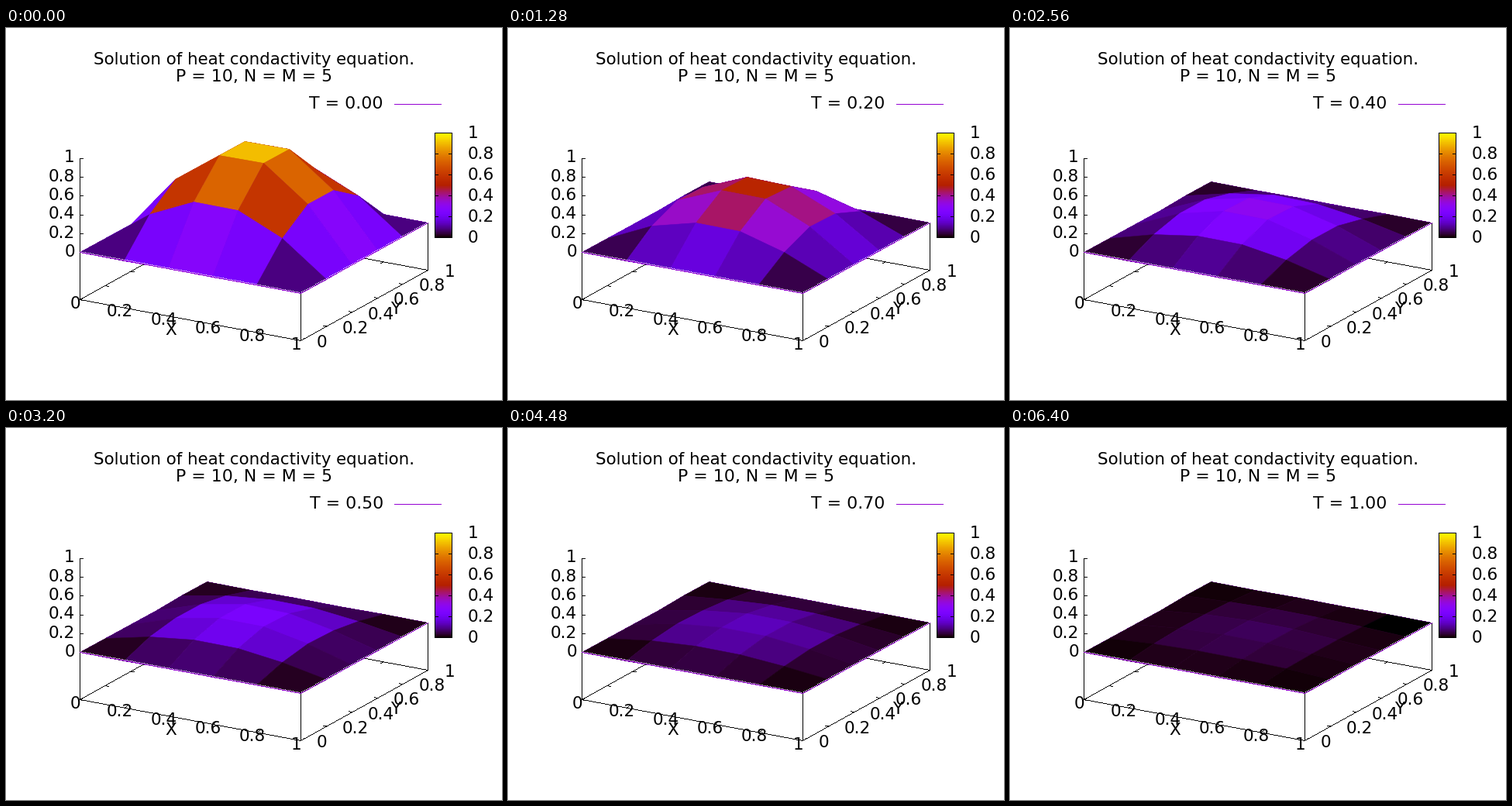
A matplotlib script that plays this animation: 640 by 480 pixels, repeating every 7040 ms.

```python
import numpy as np
import matplotlib.pyplot as plt
from matplotlib.animation import FuncAnimation
from matplotlib.collections import PolyCollection

W, H, DPI = 640, 480, 100
PX = 72 / DPI                      # one pixel in points
PURPLE = "#9400D3"
CELLS, STEPS, SWEEPS = 5, 10, 3
RATE = 0.096                       # diffusion number of one sweep
LEVELS = 192
ORIGIN = np.array([95, 289.2])
EX, EY = np.array([285, 52.5]), np.array([164.3, -91])
EZ = np.array([0, -121.5])
FLOOR = -60.8 / 121.5
SQUARE = np.array([[0, 0], [1, 0], [1, 1], [0, 1]])


def project(x, y, z=0.0):
    return ORIGIN + x * EX + y * EY + z * EZ


def heat_colour(value):
    level = min(int(max(value, 0) * LEVELS), LEVELS - 1)
    g = level / (LEVELS - 1)
    return np.sqrt(g), g ** 3, max(np.sin(2 * np.pi * g), 0)


def solve():
    """Temperature fields for all time steps, relaxed in place."""
    s = np.sin(np.pi * np.linspace(0, 1, CELLS + 1))
    s[-1] = 0
    u = np.outer(s, s)
    fields = [u.copy()]
    for _ in range(STEPS):
        for _ in range(SWEEPS):
            for i in range(1, CELLS):
                for j in range(1, CELLS):
                    around = u[i - 1, j] + u[i + 1, j] + u[i, j - 1] + u[i, j + 1]
                    u[i, j] += RATE * (around - 4 * u[i, j])
        fields.append(u.copy())
    return fields


fields = solve()
grid = np.linspace(0, 1, CELLS + 1)

fig = plt.figure(figsize=(W / DPI, H / DPI), dpi=DPI, facecolor="white")
ax = fig.add_axes([0, 0, 1, 1])


def to_pixel(p):
    return np.floor(np.asarray(p, float) + 0.5)


def trace(p, q):
    """Pixels of a hard one-pixel line from p to q."""
    p, q = to_pixel(p), to_pixel(q)
    n = int(abs(q - p).max())
    return to_pixel(np.linspace(p, q, n + 1))


def squares(pixels):
    return np.asarray(pixels)[:, None, :] + SQUARE


def polygons(verts, zorder, color="black", **kw):
    coll = PolyCollection(verts, facecolors=color, snap=False, zorder=zorder,
                          **{"edgecolors": "none", "linewidths": 0, **kw})
    ax.add_collection(coll, autolim=False)
    return coll


def line(p, q, color="black", zorder=1):
    polygons(squares(trace(p, q)), zorder, color)


def label(x, y, text, ha="center", size=21.6):
    return ax.text(x, y, text, ha=ha, va="baseline", size=size * PX,
                   family="DejaVu Sans", color="black", zorder=6)


def draw_box():
    corners = [(0, 0), (1, 0), (1, 1), (0, 1), (0, 0)]
    for a, b in zip(corners, corners[1:]):
        line(project(*a, FLOOR), project(*b, FLOOR))
    for a in corners[:3]:
        line(project(*a, FLOOR), project(*a))
    line(project(0, 0), project(0, 0, 1))

    tick_x, tick_y = 0.014 * EX, 0.024 * EY
    for k, v in enumerate(grid):
        name = f"{v:.1g}"
        for side, sign in ((0, 1), (1, -1)):
            p, q = project(v, side, FLOOR), project(side, v, FLOOR)
            line(p, p + sign * tick_y)
            line(q, q + sign * tick_x)
        z = project(0, 0, v)
        line(z, z + [4, 0])
        label(89.8 + 57 * k, 361.8 + 10.6 * k, name)
        label(401 + 33 * k, 412 - 18.2 * k, name, "left")
        label(88.8, z[1] + 5.7, name, "right")
    label(213, 395.5, "X")
    label(503, 369, "Y")


def draw_colour_bar():
    left, right, top, bottom = 553, 575, 135, 270
    ramp = [[heat_colour(v)] for v in np.linspace(1, 0, bottom - top + 1)]
    ax.imshow(ramp, extent=(left, right + 1, bottom + 1, top), aspect="auto",
              interpolation="nearest", zorder=3)
    for y in (top, bottom):
        line((left, y), (right, y), zorder=4)
    for x in (left, right):
        line((x, top), (x, bottom), zorder=4)
    for v in grid:
        y = bottom - v * (bottom - top)
        line((left, y), (left + 4, y), zorder=4)
        line((right - 4, y), (right, y), zorder=4)
        label(595.7, y + 6.7, f"{v:.1g}", "left")


draw_box()
draw_colour_bar()
label(320, 47, "Solution of heat condactivity equation.", size=21.4)
label(320, 69, "P = 10, N = M = 5", size=22)
line((501, 98), (561, 98), PURPLE, 4)
time_label = label(486.8, 104, "", "right", 22)

wires = polygons([], 2, PURPLE)
surface = polygons([], 3, linewidths=0.5 * PX)

# near rim of the plate: purple with white gaps above it
for a, b in (((0, 0), (1, 0)), ((1, 0), (1, 1))):
    rim = trace(project(*a), project(*b))
    polygons(squares(rim), 4, PURPLE)
    polygons(squares(rim[1:-1:2] - [0, 1]), 4, "white")

ax.set_xlim(0, W)
ax.set_ylim(H, 0)
ax.axis("off")


def update(step):
    u = fields[step]
    pts = to_pixel([[project(x, y, u[i, j]) for j, y in enumerate(grid)]
                    for i, x in enumerate(grid)])
    quads, colours = [], []
    for j in reversed(range(CELLS)):          # back to front
        for i in range(CELLS):
            quad = np.array([pts[i, j], pts[i + 1, j], pts[i + 1, j + 1], pts[i, j + 1]])
            quads.append(quad + 0.5)
            colours.append(heat_colour(u[i:i + 2, j:j + 2].mean()))
    surface.set_verts(quads)
    surface.set_facecolor(colours)
    surface.set_edgecolor(colours)

    rows = list(pts) + list(pts.transpose(1, 0, 2))
    wires.set_verts(squares(np.concatenate(
        [trace(p, q) for row in rows for p, q in zip(row, row[1:])])))
    time_label.set_text(f"T = {step / STEPS:.2f}")
    return surface, wires, time_label


anim = FuncAnimation(fig, update, frames=STEPS + 1, interval=640, repeat=True, blit=False)
plt.show()
```
